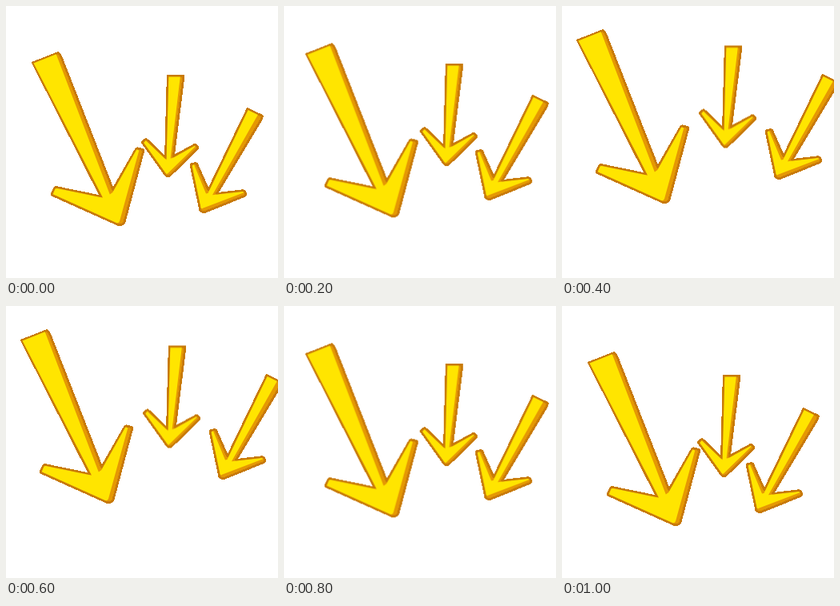
An HTML page for the animation above (1.1 s loop, 340 by 340 pixels).

```html
<!DOCTYPE html>
<html lang="en">
<head>
<meta charset="utf-8">
<title>Bouncing arrows</title>
<style>
  html, body { margin: 0; width: 100%; height: 100%; overflow: hidden; background: #fff; }
  svg { display: block; width: 340px; height: 340px; }
  .body { fill: #e59803; stroke: #c87a0a; stroke-width: 2.8; stroke-linejoin: round; shape-rendering: crispEdges; }
  .face { fill: #ffe500; }
</style>
</head>
<body>
<svg id="stage" viewBox="0 0 340 340"></svg>
<script>
const STEP = 100, COUNT = 11;

// body: outer silhouette, face: lit front, lift: offset at the top of the bounce
const arrows = [
  {
    body: "M33.5 71 L65 58.5 L68.5 62.5 L133.7 229.5 L162.5 179 Q163.5 177.5 165 178 L170.5 179.5 Q172 180 171.5 182 L148 270 Q146 274.5 140.5 273.5 L58 236.5 Q56.5 235.5 57.5 234 L60.5 228 Q61.5 226 64 226.8 L118.5 238 Z",
    face: "M34.5 71.5 L62.7 60.2 L129.8 235.5 L133.3 233 L163.2 179.4 L166.3 180.5 L142 269 Q141 271.5 138.5 271.3 L58.7 235.3 L61.5 228.5 Q62.3 227.7 64 228.1 L121.2 239.8 Z",
    lift: [-15.5, -31]
  },
  {
    body: "M202.3 87.5 L222 87.5 L221.5 92 L209.3 187.8 L235.5 173.5 Q237 173 238 174 L239.5 176 Q240.2 177 239 178.5 L206 211 Q202.5 214.5 199.5 211.5 L171 171.5 Q170.2 170.2 171.5 169 L174 167 Q175.2 166.3 176.5 167.5 L199.5 189.8 Z",
    face: "M203.4 88.6 L217.8 88.6 L205.6 190.5 L208.5 190 L235.8 174.7 L236.6 175.7 L203 208.5 Q201.3 210.5 200 209.5 L172.2 171 L174.7 168.2 L200.6 192.5 Z",
    lift: [2.2, -40.4]
  },
  {
    body: "M302 128.5 L320.5 137.5 L319 142 L263.5 234.5 L296 230.7 Q298 230.5 298.6 232 L299.6 235 Q300 236.5 298.5 237.3 L250 257 Q245 258.5 242.8 255 L231.3 200 Q231 197.8 233 197.3 L236.5 196.7 Q238.5 196.5 239 198.5 L253 230 Z",
    face: "M302.6 130.1 L314.8 136 L258 236.2 L296.3 232 L297.2 233.2 L246 252.7 Q244.3 253.8 243.7 252.5 L232.6 199.5 L235 198.2 L250 234.5 L252.5 234 Z",
    lift: [26.5, -46.5]
  }
];

const stage = document.getElementById("stage");

function add(parent, tag, attrs = {}) {
  const node = document.createElementNS("http://www.w3.org/2000/svg", tag);
  for (const key in attrs) node.setAttribute(key, attrs[key]);
  return parent.appendChild(node);
}

// One full cosine swing, with the rest pose at both ends
const swing = i => (1 - Math.cos(2 * Math.PI * i / (COUNT - 1))) / 2;

for (const { body, face, lift: [dx, dy] } of arrows) {
  const group = add(stage, "g");
  add(group, "path", { class: "body", d: body });
  add(group, "path", { class: "face", d: face });

  const poses = Array.from({ length: COUNT + 1 }, (_, i) => {
    const k = swing(Math.min(i, COUNT - 1));
    return {
      offset: i / COUNT,
      easing: "step-end",
      transform: `translate(${(dx * k).toFixed(2)}px, ${(dy * k).toFixed(2)}px)`
    };
  });
  group.animate(poses, { duration: STEP * COUNT, iterations: Infinity });
}
</script>
</body>
</html>
```
